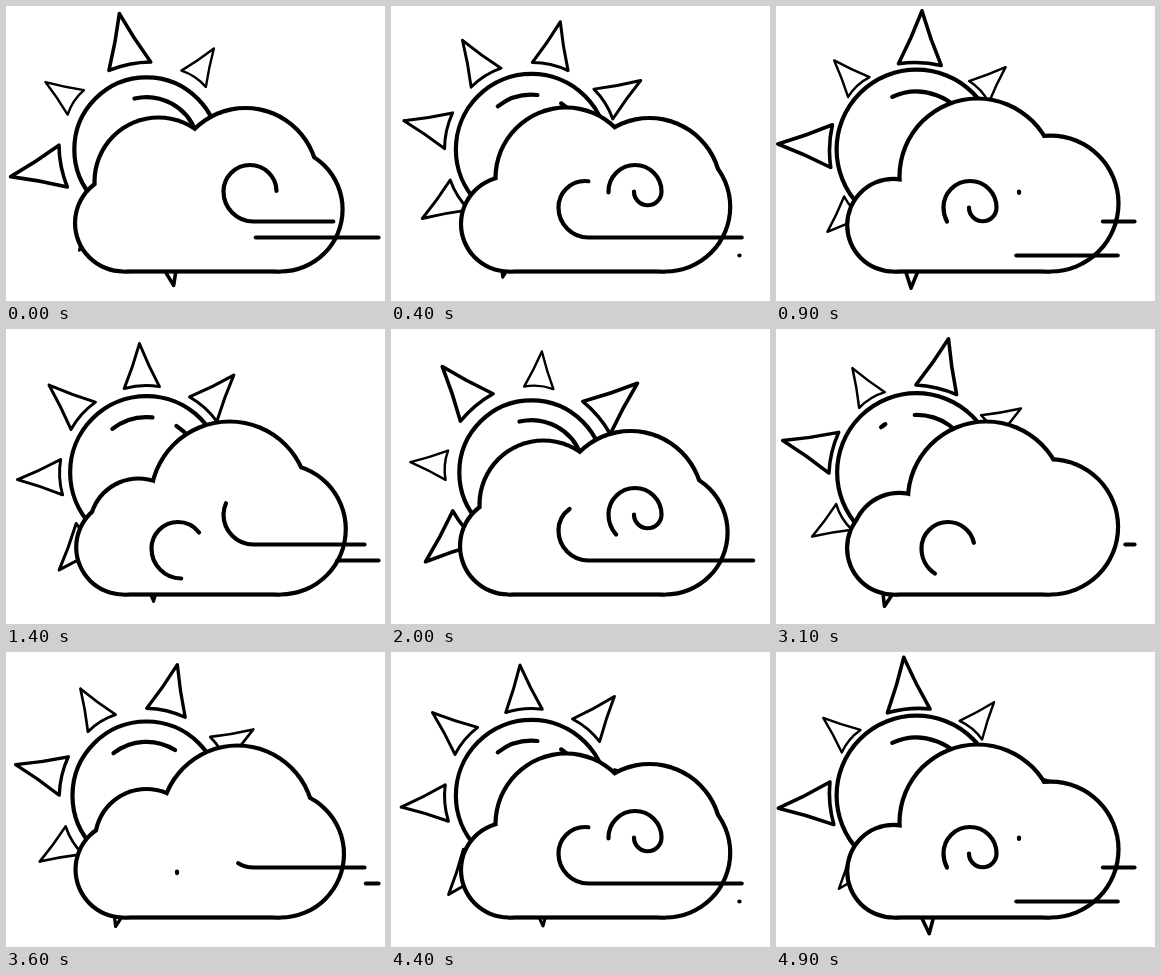
These frames come from a looping animation (379 by 295 pixels, 5000 ms). An HTML page with a canvas:

```html
<!DOCTYPE html>
<html lang="en">
<head>
<meta charset="utf-8">
<title>Sun, cloud and wind</title>
<style>
html, body { margin: 0; width: 100%; height: 100%; overflow: hidden; background: #fff; }
canvas { display: block; }
</style>
</head>
<body>
<canvas id="stage" width="379" height="295"></canvas>
<script>
const ctx = document.getElementById('stage').getContext('2d');
const LOOP = 5000, STEP = 100, TAU = Math.PI * 2, LINE = 4.2;
const SUN = { x: 140, y: 143 };
const rad = deg => deg * Math.PI / 180;
const clamp = v => Math.max(0, Math.min(1, v));
const ease = (t, from, to) => {
  const x = clamp((t - from) / (to - from));
  return x * x * (3 - 2 * x);
};

// Life of one cloud bump: age in ms, centre x, centre y, radius
const BUMP = [
  [-480, 117, 218, 46], [0, 132, 198, 49], [200, 140, 188, 51.5],
  [600, 152, 175, 64], [1000, 174.5, 171.5, 70.5], [1500, 201, 170, 78],
  [2000, 223, 171, 79], [2200, 231, 169.5, 76.5], [2600, 239, 174, 72.5],
  [3000, 258, 183, 71.5], [3200, 268, 190, 71], [3500, 273, 198, 67]
];

// Each gust: line start, line end, height, times of its head and its tail
const GUSTS = [
  { x0: 358, x1: 247, y: 215, head: [-1050, 350], tail: [-250, 965] },
  { x0: 372, x1: 197, y: 231, head: [-560, 840], tail: [215, 1430] },
  { x0: 348, x1: 175, y: 249, head: [385, 1770], tail: [800, 2000] }
];
const GUST_STARTS = [-2340, 0, 1660, 4000, 5660];

function ray(angle, size) {
  const base = 85, w = 18 + 3.4 * size, tip = 130 + 8.75 * size;
  const mid = (base + tip) / 2;
  ctx.save();
  ctx.rotate(angle);
  ctx.beginPath();
  ctx.moveTo(tip, 0);
  ctx.quadraticCurveTo(mid, w * 0.42, base, w);
  ctx.quadraticCurveTo(base + 4, 0, base, -w);
  ctx.quadraticCurveTo(mid, -w * 0.42, tip, 0);
  ctx.lineWidth = 3 + 0.6 * size;
  ctx.stroke();
  ctx.restore();
}

function sun(t, pulse) {
  const r = 76 - 3.9 * pulse;
  const lag = Math.max(0, 1 - t / 1667);
  const turn = 50.7 + 0.0896 * t + 28 * lag * lag;
  ctx.save();
  ctx.translate(SUN.x, SUN.y);
  for (let i = 0; i < 8; i++) ray(rad(turn + 45 * i), i % 2 ? -pulse : pulse);

  ctx.lineWidth = LINE;
  ctx.beginPath();
  ctx.arc(0, 0, r, 0, TAU);
  ctx.stroke();

  // Glints run clockwise inside the disc, one each second
  for (let age = t % 1000; age < 2000; age += 1000) {
    const head = Math.min(-20, -128 + 0.13 * (age - 60));
    const tail = Math.max(-128, -128 + 0.115 * (age - 785));
    if (head <= tail) continue;
    ctx.beginPath();
    ctx.arc(0, 0, r * 0.725, rad(tail), rad(head));
    ctx.stroke();
  }
  ctx.restore();
}

function bumpAt(age) {
  const i = BUMP.findIndex(b => b[0] > age);
  if (i < 1) return null;
  const a = BUMP[i - 1], b = BUMP[i], k = (age - a[0]) / (b[0] - a[0]);
  return [1, 2, 3].map(n => a[n] + (b[n] - a[n]) * k);
}

function cloud(t, pulse) {
  const left = 47.4 + 1.1 * pulse, right = 65 - 3 * pulse;
  const circles = [[117, 265 - left, left], [274, 265 - right, right]];
  for (let age = t % 2000 - 1400; age < 3500; age += 2000) {
    const bump = bumpAt(age);
    if (bump) circles.push(bump);
  }
  // Black union, then the same union inset in white
  for (const [color, grow] of [['#000', LINE / 2], ['#fff', -LINE / 2]]) {
    ctx.fillStyle = color;
    for (const [x, y, r] of circles) {
      ctx.beginPath();
      ctx.arc(x, y, r + grow, 0, TAU);
      ctx.fill();
    }
    ctx.fillRect(117, 195, 157, 70 + grow);
  }
}

function gust({ x0, x1, y, head, tail }, t) {
  const length = x0 - x1 + Math.PI * (15 + 26.5 + 13.75);
  const from = ease(t, ...tail) * length, to = ease(t, ...head) * length;
  if (to <= from) return;
  const cy = y - 30;
  ctx.setLineDash([to - from, 9999]);
  ctx.lineDashOffset = -from;
  ctx.beginPath();
  ctx.moveTo(x0, y);
  ctx.arc(x1, cy, 30, Math.PI / 2, Math.PI);
  ctx.arc(x1 - 3.5, cy, 26.5, Math.PI, TAU);
  ctx.arc(x1 + 9.25, cy, 13.75, 0, Math.PI);
  ctx.stroke();
  ctx.setLineDash([]);
}

function draw(t) {
  const pulse = Math.cos(TAU * (t + 70) / 2000);
  ctx.setTransform(1, 0, 0, 1, 0, 0);
  ctx.fillStyle = '#fff';
  ctx.fillRect(0, 0, 379, 295);
  ctx.translate(0.5, 0.5);
  ctx.strokeStyle = '#000';
  ctx.lineCap = ctx.lineJoin = 'round';
  sun(t, pulse);
  cloud(t, pulse);
  ctx.lineWidth = LINE;
  for (const start of GUST_STARTS) {
    for (const g of GUSTS) gust(g, t - start);
  }
}

function tick() {
  const t = performance.now() % LOOP;
  draw(Math.floor(t / STEP) * STEP);
  requestAnimationFrame(tick);
}
tick();
</script>
</body>
</html>
```
